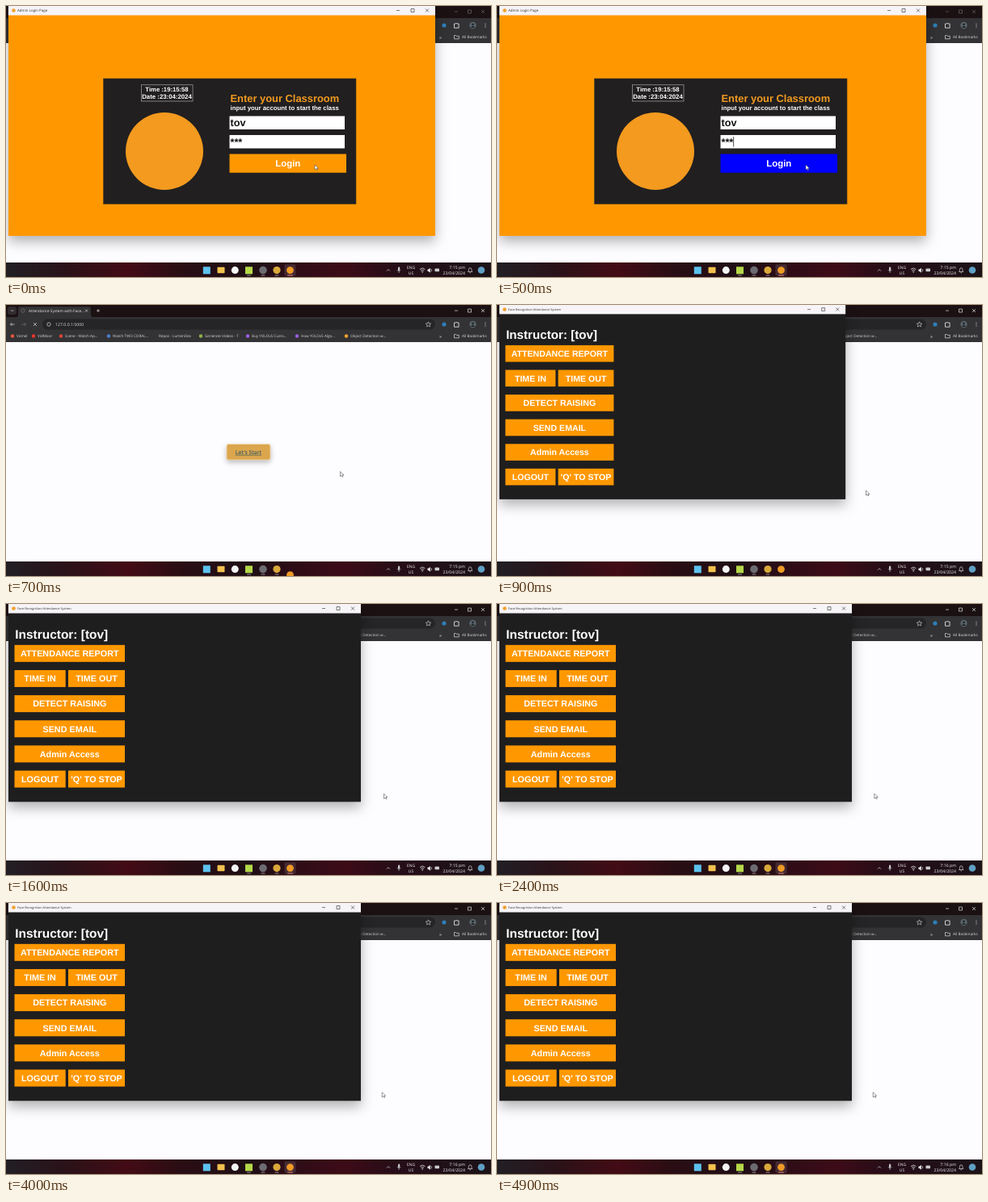
Write an HTML page that moves like this. It is 600x336 px and loops after 5 s.

```html
<!DOCTYPE html>
<html lang="en">
<head>
<meta charset="utf-8">
<title>Classroom login</title>
<style>
  html, body { margin: 0; width: 100%; height: 100%; overflow: hidden; background: #fff; }
  svg { display: block; width: 100vw; height: 100vh; text-rendering: geometricPrecision; }
  .ui { font-family: "Open Sans", "Noto Sans", sans-serif; }
  .app { font-family: "Liberation Sans", Arial, sans-serif; font-weight: bold; }
  .shadow { filter: drop-shadow(0 7px 8px rgba(0, 0, 0, .3)); }
  .glow { filter: drop-shadow(0 3px 3px rgba(0, 0, 0, .25)); }
</style>
</head>
<body>
<svg id="stage" viewBox="0 0 600 336" preserveAspectRatio="none"></svg>
<script>
const LOOP = 5000, STEP = 100;
const ORANGE = '#ff9800', DARK = '#1f1e1f';

const rect = (x, y, w, h, fill, more = '') =>
  `<rect x="${x}" y="${y}" width="${w}" height="${h}" fill="${fill}" ${more}/>`;
const dot = (x, y, r, fill, more = '') =>
  `<circle cx="${x}" cy="${y}" r="${r}" fill="${fill}" ${more}/>`;
const line = (d, color, width = .7, more = '') =>
  `<path d="${d}" fill="none" stroke="${color}" stroke-width="${width}" ${more}/>`;
const text = (x, y, size, fill, str, anchor = 'start', more = '') =>
  `<text x="${x}" y="${y}" font-size="${size}" fill="${fill}" text-anchor="${anchor}" ${more}>${str}</text>`;
const group = (attrs, ...parts) => `<g ${attrs}>${parts.join('')}</g>`;

// Minimise, maximise and close, centred on x, x + gap and x + 2 gap
const windowKeys = (x, y, gap, color) =>
  line(`M${x - 2} ${y}h4M${x + gap - 2} ${y - 2}h4v4h-4z` +
       `M${x + 2 * gap - 2} ${y - 2}l4 4m0-4l-4 4`, color);

const titleBar = (w, title, size, keysX) =>
  rect(3, 0, w, 11.5, '#f6f4f6') + dot(9.5, 5.5, 2.3, '#f0a02c') +
  text(14, 7.2, size, '#333', title, 'start', 'class="ui"') + windowKeys(keysX, 5.5, 18, '#444');

function browser() {
  const marks = [
    [8, '#e0563f', 'Vomel'], [34, '#e8352c', 'VidMoor'], [68, '#d8453c', 'Scene - Watch Ap...'],
    [127, '#4a7fd0', 'Watch TWO CORAL...'], [184, '', 'Repos - LumenDev'],
    [241, '#8fae4c', 'Generate Videos - T'], [299, '#9a5fe0', 'Buy YOLOv5 Custo...'],
    [360, '#9a5fe0', 'How YOLOv5 Algo...'], [421, '#f0a02c', 'Object Detection w...']
  ].map(([x, color, label]) =>
    (color ? dot(x, 38.5, 2.2, color) : '') + text(x + 5, 40.3, 4.6, '#d4d4d6', label));
  return group('class="ui"',
    rect(0, 0, 600, 336, '#fdfcfe'),
    rect(0, 0, 600, 15, '#1b1113'),
    rect(2, 2, 11, 10, '#332c2e', 'rx="3"'), line('M6 6.2l1.7 1.7 1.7-1.7', '#ddd'),
    '<path d="M13 15q2 0 2-3V5q0-3 3-3h84q3 0 3 3v7q0 3 2 3z" fill="#333234"/>',
    dot(21, 7, 2.2, 'none', 'stroke="#777" stroke-width=".7"'),
    text(28, 9, 4.8, '#e8e8e8', 'Attendance System with Face...'),
    line('M98 5.5l3 3m0-3l-3 3M112 7h4m-2-2v4', '#ddd'),
    group('id="browserKeys"', windowKeys(557, 7, 16.5, '#e0e0e0')),
    rect(0, 15, 600, 31, '#333234'),
    line('M10.5 24h-5m2-2l-2 2 2 2M34 22l4 4m0-4l-4 4', '#ddd'),
    line('M19.5 24h5m-2-2l2 2-2 2', '#777'),
    rect(45, 17.5, 486, 13, '#252527', 'rx="6.5"'),
    dot(53, 24, 2.2, 'none', 'stroke="#ddd" stroke-width=".7"'),
    text(61, 26, 5.2, '#ddd', '127.0.0.1:5000'),
    line('M522.5 20.8l.9 2.1 2.3.2-1.7 1.5.5 2.3-2-1.2-2 1.2.5-2.3-1.7-1.5 2.3-.2z', '#ddd', .6),
    dot(542, 24, 2.6, '#2d7fb8'),
    line('M554.5 22h2q.8-2 1.6 0h2v5.2h-5.6z', '#ddd', .9),
    dot(577.5, 24, 4.2, '#59646a'), dot(577.5, 22.8, 1.4, '#20262a'),
    '<path d="M574.9 27q2.6-4.5 5.2 0z" fill="#20262a"/>',
    ...[22, 24, 26].map(y => dot(593, y, .6, '#ddd')),
    ...marks,
    text(536, 40.5, 6, '#ddd', '»'),
    line('M554.5 36.5h2l.8.8h3v3.5h-5.8z', '#ddd'),
    text(564, 40.3, 4.6, '#ddd', 'All Bookmarks'),
    rect(273, 172.5, 54, 19.5, '#dca64d', 'rx="2.5" stroke="#f1d9ae" stroke-width=".8" class="glow"'),
    text(300, 184.8, 6.7, '#365a62', "Let's Start", 'middle', 'font-weight="600" text-decoration="underline"'));
}

function loginWindow() {
  return rect(3, 0, 528, 285, ORANGE, 'class="shadow"') +
    titleBar(528, 'Admin Login Page', 4.45, 485) +
    group('class="app"',
      rect(120.5, 90, 312.5, 155.5, '#211f20', 'stroke="#4a3a20" stroke-width=".6"'),
      rect(167.5, 97.8, 63.5, 20.2, 'none', 'stroke="#aaa" stroke-width=".7"'),
      text(199, 106.2, 7.7, '#fff', 'Time :19:15:58', 'middle'),
      text(199, 115.2, 7.8, '#fff', 'Date :23:04:2024', 'middle'),
      dot(196, 180, 48, '#f39a1f'),
      text(277.5, 118.6, 12.9, '#f29a20', 'Enter your Classroom'),
      text(277.5, 129.3, 7.8, '#fff', 'input your account to start the class'),
      rect(276.5, 136.5, 142.5, 16.5, '#fff'), text(277.5, 149.3, 12.7, '#111', 'tov'),
      rect(276.5, 160, 142.5, 16.5, '#fff'), text(277.5, 173.3, 12.7, '#111', '***'),
      rect(292.3, 162, .8, 12.5, '#222', 'id="caret"'),
      rect(276.5, 183.5, 144.5, 23.2, ORANGE, 'id="loginKey"'),
      text(348.8, 199.3, 11.4, '#fff', 'Login', 'middle'));
}

function menuWindow() {
  const rows = [['ATTENDANCE REPORT'], ['TIME IN', 'TIME OUT'], ['DETECT RAISING'],
                ['SEND EMAIL'], ['Admin Access'], ['LOGOUT', "'Q' TO STOP"]];
  const key = (x, w, y, label) =>
    rect(x, y, w, 21, ORANGE) + text(x + w / 2, y + 14.3, 10.8, '#fff', label, 'middle');
  const keys = rows.map(([left, right], i) => {
    const y = 50.8 + i * 31.15;
    return right ? key(10.5, 63.2, y, left) + key(77, 70, y, right) : key(10.5, 136.5, y, left);
  });
  return rect(3, 0, 436, 245.3, DARK, 'class="shadow"') +
    titleBar(436, 'Face Recognition Attendance System', 3.9, 393) +
    group('class="app"', text(11.3, 42.8, 15.45, '#fff', 'Instructor: [tov]'), ...keys);
}

function taskbar() {
  const running = x => rect(x - 2.5, 333.6, 5, 1, '#9a8c90', 'rx=".5"');
  const tints = [[0, '#211f24'], [.12, '#2a1219'], [.25, '#430b15'], [.36, '#2a0d14'],
                 [.5, '#1f0e15'], [.7, '#3d0b18'], [.8, '#260d17'], [1, '#1b1218']]
    .map(([at, color]) => `<stop offset="${at}" stop-color="${color}"/>`).join('');
  return group('class="ui"',
    `<linearGradient id="bar">${tints}</linearGradient>`,
    rect(0, 318, 600, 18, 'url(#bar)'),
    rect(243.8, 323.3, 9, 9, '#5cc2ee'),
    rect(261.5, 323.8, 9, 7.5, '#f2c14e', 'rx=".8"'),
    dot(283.3, 327.6, 4.5, '#f4f4f4'),
    rect(296, 323.3, 9, 9, '#b5d84a'),
    dot(318, 327.6, 4.8, '#6d6b72'),
    dot(335, 327.6, 4.6, '#d9a83a'),
    running(300.5), running(318), running(335),
    group('id="appMark"', rect(344.5, 320.5, 14, 14, '#fff', 'rx="1.5" opacity=".12"'),
      rect(348, 333.6, 7, 1, '#e58a7c', 'rx=".5"')),
    group('id="appIcon"', dot(351.5, 327.6, 4.4, '#ef9a25')),
    line('M471 328.6l2-2 2 2', '#ddd'),
    rect(485, 323.5, 2.2, 4.8, '#ccc', 'rx="1.1"'), line('M483.9 327q2.2 4 4.4 0m-2.2 2v2', '#ccc', .6),
    text(501, 325.8, 5, '#eee', 'ENG', 'middle'), text(501, 332.8, 5, '#eee', 'US', 'middle'),
    line('M512 326.5q3.2-3 6.4 0M513.3 328.2q1.9-1.7 3.8 0', '#eee', .8), dot(515.2, 329.8, .8, '#eee'),
    '<path d="M521.5 326.5h1.3l2-1.8v6l-2-1.8h-1.3z" fill="#eee"/>', line('M526 326q1.3 1.7 0 3.4', '#eee'),
    rect(530.5, 325.5, 5.5, 3.8, '#ccc', 'rx=".8"'),
    text(568, 325.8, 5.2, '#eee', '', 'end', 'id="clock"'),
    text(568, 332.8, 5.2, '#eee', '23/04/2024', 'end'),
    line('M571.5 329.5q1-.8 1-3 0-1.8 1.7-1.8t1.7 1.8q0 2.2 1 3zm2 1.3h1.5', '#ddd'),
    dot(588, 327.5, 4.3, '#5f9fc4'));
}

const pointer = '<path id="pointer" d="M0 0v6l1.5-1.3 1 2 1-.5-1-1.9h2z" fill="#fff" stroke="#333" stroke-width=".5"/>';

document.getElementById('stage').innerHTML =
  browser() + group('id="login"', loginWindow()) + group('id="menu"', menuWindow()) + taskbar() + pointer;

const part = id => document.getElementById(id);
const show = (id, on) => part(id).setAttribute('visibility', on ? 'inherit' : 'hidden');
const set = (id, name, value) => part(id).setAttribute(name, value);

// time, x, y of the pointer tip
const path = [[0, 382, 197], [600, 382, 197], [700, 413.5, 206.5], [800, 438, 220], [900, 456.5, 230],
              [1000, 463, 233.5], [1300, 467, 235], [1600, 467.5, 235.3], [2200, 467.5, 235.3],
              [2600, 466, 235], [3200, 466, 235], [3300, 465.2, 234.7], [LOOP, 465.2, 234.7]];

function pointerAt(t) {
  const i = path.findIndex(p => p[0] > t);
  const [t0, x0, y0] = path[i - 1], [t1, x1, y1] = path[i];
  const k = (t - t0) / (t1 - t0);
  return [x0 + (x1 - x0) * k, y0 + (y1 - y0) * k];
}

function render(t) {
  const pressed = t >= 300, closing = t >= 600;
  show('login', t < 700);
  set('login', 'opacity', closing ? .75 : 1);
  set('login', 'transform', closing ? 'translate(267 142) scale(.99) translate(-267 -142)' : '');
  set('loginKey', 'fill', pressed ? '#0000ff' : ORANGE);
  show('caret', pressed);
  set('browserKeys', 'opacity', t < 700 ? .4 : 1);

  show('menu', t >= 900);
  set('menu', 'transform', t < 1000 ? 'translate(3 0) scale(.982) translate(-3 0)' : '');

  show('appIcon', t !== 800);
  set('appIcon', 'transform', t === 700 ? 'translate(0 7)' : '');
  show('appMark', t < 700 || t >= 1300);
  part('clock').textContent = t < 1800 ? '7:15 pm' : '7:16 pm';
  set('pointer', 'transform', `translate(${pointerAt(t)})`);
}

const start = performance.now();
function tick() {
  const t = (performance.now() - start) % LOOP;
  render(Math.floor(t / STEP) * STEP);
  requestAnimationFrame(tick);
}
tick();
</script>
</body>
</html>
```
